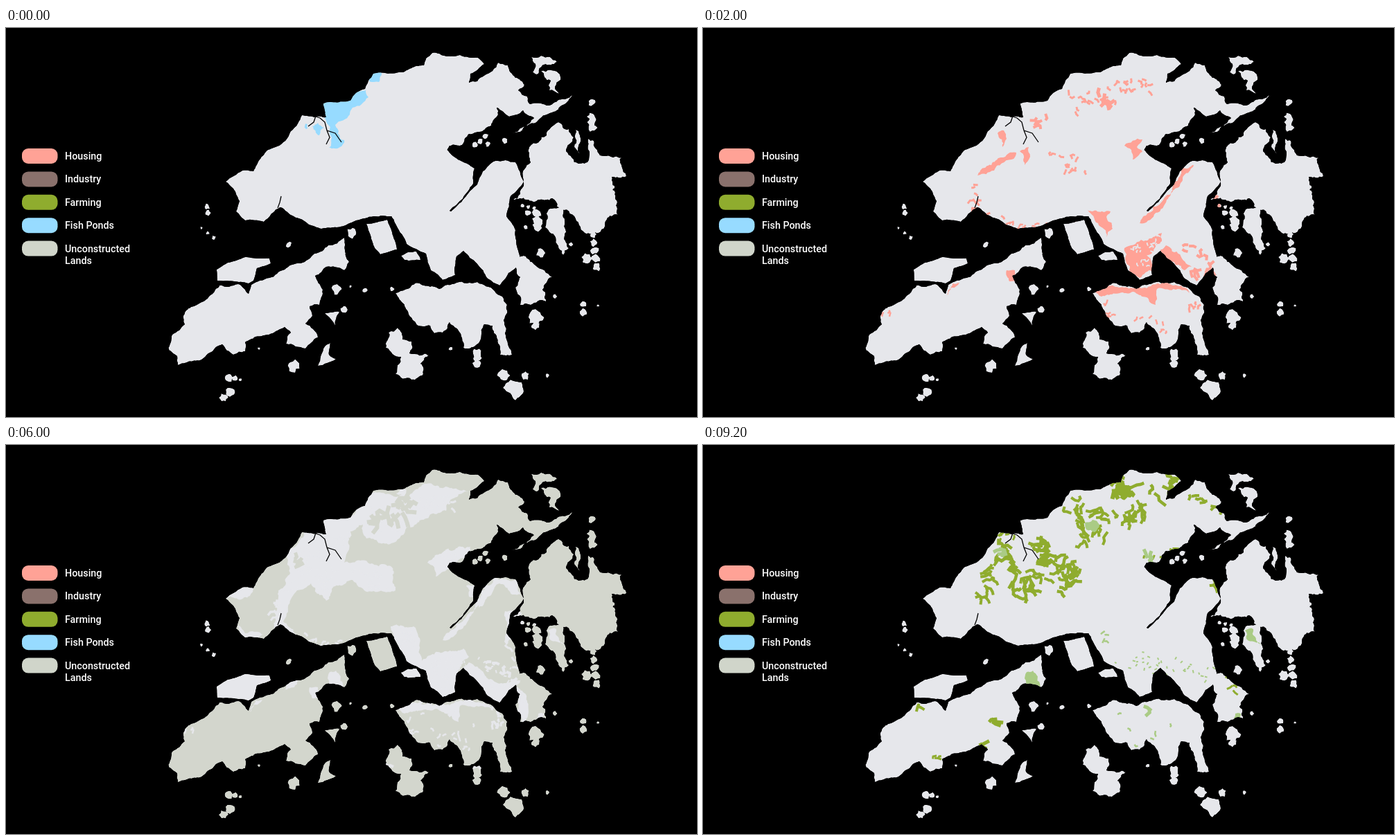
Write an HTML page that moves like this. It is 997 px wide and 562 px high and loops after 10000 ms.

```html
<!DOCTYPE html>
<html lang="en">
<head>
<meta charset="utf-8">
<title>Land use</title>
<style>
  html, body { margin: 0; width: 100%; height: 100%; overflow: hidden; background: #000; }
  svg { display: block; width: 997px; height: 562px; }
  text { font: 500 14.3px Roboto, Arial, sans-serif; fill: #fff; }
</style>
</head>
<body>
<svg id="stage" viewBox="0 0 997 562">
  <defs><clipPath id="coast"><path id="coastShape"/></clipPath></defs>
</svg>
<script>
const STEP = 2000;
const C = {
  land: '#e6e7eb', housing: '#ffa296', industry: '#8a716c', farming: '#8fac2e',
  park: '#aacb85', ponds: '#97dbff', open: '#d3d6cd'
};
const stage = document.getElementById('stage');

function add(parent, tag, attrs, text) {
  const el = document.createElementNS('http://www.w3.org/2000/svg', tag);
  for (const k in attrs) el.setAttribute(k, attrs[k]);
  if (text) el.textContent = text;
  return parent.appendChild(el);
}

const points = s => s.trim().split(/\s+/).map(p => p.split(',').map(Number));
const mix = (p, q, t) => [p[0] + (q[0] - p[0]) * t, p[1] + (q[1] - p[1]) * t];

function random([x, y]) {
  let s = (x * 7919 + y * 104729) >>> 0;
  return () => {
    s = (s + 0x6d2b79f5) >>> 0;
    let t = Math.imul(s ^ s >>> 15, s | 1);
    t ^= t + Math.imul(t ^ t >>> 7, t | 61);
    return ((t ^ t >>> 14) >>> 0) / 4294967296;
  };
}

// Same winding everywhere, so overlapping pieces merge into one shape.
function toPath(pts) {
  const area = pts.reduce((sum, p, i) => {
    const q = pts[(i + 1) % pts.length];
    return sum + p[0] * q[1] - q[0] * p[1];
  }, 0);
  if (area < 0) pts.reverse();
  return 'M' + pts.map(p => p.map(v => v.toFixed(1)).join(' ')).join('L') + 'Z';
}

// Fractal outline through a few key points: every edge is split and bent until it is short.
function outline(str, rough = .1) {
  const keys = points(str), rnd = random(keys[0]), out = [];
  const split = (p, q) => {
    const len = Math.hypot(q[0] - p[0], q[1] - p[1]);
    if (len < 4) return out.push(p);
    const off = Math.max(-3, Math.min(3, (rnd() * 2 - 1) * len * rough)) / len;
    const m = mix(p, q, .5);
    m[0] -= (q[1] - p[1]) * off;
    m[1] += (q[0] - p[0]) * off;
    split(p, m);
    split(m, q);
  };
  keys.forEach((p, i) => split(p, keys[(i + 1) % keys.length]));
  return toPath(out);
}

function blob([x, y], r, rnd) {
  const count = Math.round(6 + r);
  return toPath(Array.from({ length: count }, (_, i) => {
    const a = i / count * 2 * Math.PI, d = r * (.7 + rnd() * .6);
    return [x + Math.cos(a) * d, y + Math.sin(a) * d];
  }));
}

// Evenly spaced islets between two points, from radius r to r2.
function chain(str, count, r, r2 = r) {
  const [p, q = p] = points(str), rnd = random(p);
  let d = '';
  for (let i = 0; i < count; i++) {
    const t = count > 1 ? i / (count - 1) : 0;
    d += blob(mix(p, q, t), r + (r2 - r) * t, rnd);
  }
  return d;
}

// Short random walks strewn along a spine; long ones look like winding plots, short ones like specks.
function strands(str, spread, count, width, steps = 2) {
  const spine = points(str), rnd = random(spine[0]), pull = () => (rnd() + rnd() - 1) * spread * 1.4;
  let d = '';
  for (let i = 0; i < count; i++) {
    const t = (i + rnd()) / count * (spine.length - 1), k = Math.floor(t);
    const [x, y] = mix(spine[k], spine[k + 1], t - k);
    let a = rnd() * 2 * Math.PI;
    d += `M${(x + pull()).toFixed(1)} ${(y + pull()).toFixed(1)}`;
    for (let j = 0; j < steps; j++) {
      const len = width * (.4 + rnd() * .9);
      a += (rnd() - .5) * 2.6;
      d += `l${(Math.cos(a) * len).toFixed(1)} ${(Math.sin(a) * len).toFixed(1)}`;
    }
  }
  return { d, width };
}

const area = (str, rough = .2) => ({ d: outline(str, rough) });

function paint(parent, items, color) {
  items.forEach(({ d, width }) => add(parent, 'path', width
    ? { d, fill: 'none', stroke: color, 'stroke-width': width, 'stroke-linecap': 'square' }
    : { d, fill: color }));
}

const airport = '304,349 320,339 345,331 380,333 382,340 362,347 357,365 350,369 305,365';

const coast = [
  // Mainland: north-west, north-east, centre, east, south-east
  outline(`317,222 341,206 357,207 366,190 378,176 403,163 421,138 427,126 462,129 458,109 497,105
    505,94 518,88 530,66 572,64 603,54 606,44 615,36 636,41 655,39 681,43 690,52 670,66 668,78
    674,120 640,170 600,250 557,272 505,278 490,285 455,290 437,284 415,272 396,259 372,280 345,278
    332,265 337,250 328,232`, .08),
  outline(`655,78 680,77 702,62 710,50 724,54 735,72 748,82 739,90 752,99 756,110 780,112 817,97
    788,122 742,150 728,152 762,130 746,119 726,128 708,115 710,125 700,141 668,153 658,169 632,171
    620,160 640,100`, .13),
  outline(`560,180 632,171 645,185 676,203 674,225 640,264 642,265 661,246 680,226 688,207 706,192
    735,194 747,222 728,243 722,272 735,292 742,340 712,372 695,362 660,322 650,330 648,357 630,364
    613,350 606,326 578,312 563,285 555,270`, .07),
  outline(`748,204 757,194 755,172 780,155 797,136 812,146 819,158 808,178 826,196 841,190 840,160
    848,163 857,184 888,187 895,214 874,215 882,252 883,270 868,274 855,296 835,296 820,272 795,258
    788,246 770,248 732,248 747,228`, .2),
  outline(`728,338 750,330 764,343 788,360 774,378 779,395 757,400 742,400 735,375 742,360`, .2),
  // Large islands
  outline(`235,462 240,443 258,428 258,411 285,395 308,372 335,370 350,384 354,371 380,361 402,349
    445,326 465,314 488,303 495,338 488,350 462,345 446,358 457,378 452,400 438,402 442,416 432,427
    450,447 432,463 404,456 411,440 402,432 360,446 345,454 345,467 328,472 312,457 280,480 248,487
    247,474`, .12),
  outline(`562,383 590,369 625,377 650,368 680,367 705,380 723,400 718,422 730,472 713,472 702,430
    690,428 676,460 660,462 652,436 640,425 630,440 618,441 612,430 592,428 575,400`, .14),
  outline(`552,440 565,433 572,450 585,453 582,470 612,472 598,485 602,500 585,508 562,500 570,475
    548,462`, .2),
  outline(airport, .03),
  outline('520,283 550,277 564,320 540,327 532,318', .04),
  outline('570,329 592,323 598,335 575,335'),
  // Small islands
  outline('758,42 772,40 795,49 776,53 768,66 760,64 764,52', .2),
  outline('772,62 797,65 800,75 792,85 798,95 784,90 786,76', .2),
  outline('822,147 829,164 828,182 820,172', .2),
  outline('783,262 800,258 806,300 812,318 804,328 778,288', .2),
  outline('717,520 728,508 744,512 747,525 735,538'),
  outline('460,460 468,455 466,472 476,478 450,488'),
  outline('460,412 481,410 475,430'),
  chain('766,268 767,286', 3, 7), chain('745,257 762,260', 3, 3), chain('753,267 750,288', 2, 4, 3),
  chain('845,107', 1, 5), chain('845,128 846,144', 3, 6), chain('676,169 692,157', 3, 4),
  chain('695,167 720,163', 2, 4), chain('847,298 852,345', 5, 5, 6), chain('838,333', 1, 7),
  chain('771,325', 1, 6), chain('815,313 875,230', 2, 3), chain('833,399 833,411', 2, 4, 5),
  chain('854,401 792,388', 2, 2, 3), chain('764,418 764,430', 2, 10, 6), chain('718,502 781,502', 3, 8, 3),
  chain('679,470 680,484', 3, 6), chain('642,463', 1, 3), chain('415,488', 1, 8),
  chain('477,377 518,379', 2, 7, 4), chain('557,377 497,373', 2, 3, 2), chain('488,407', 1, 5),
  chain('499,296', 1, 7), chain('322,505 338,508', 3, 6, 2), chain('323,526 314,534', 2, 6),
  chain('290,258 291,267', 2, 4), chain('282,289 300,303', 3, 2, 3), chain('408,313', 1, 4),
  chain('237,463 365,463', 2, 3, 2)
].join('');

const ponds = [
  area(`456,110 497,103 505,92 520,88 523,100 500,115 496,125 475,140 488,162 482,172 466,173
    470,158 460,130`),
  area('524,68 541,62 538,78 524,77'),
  area('442,142 450,137 459,144 452,155'),
  strands('378,176 437,137', 1, 2, 3)
];

const housing = [
  area('396,213 400,206 430,187 452,180 445,190 420,206'),
  area('457,178 470,172 472,186 464,198'),
  area('425,152 434,148 438,160 432,172'),
  area('608,170 634,161 626,172 634,179 620,190 618,176'),
  area('686,217 692,202 708,198 688,228 668,252 630,282 650,258 668,243'),
  area('555,263 588,265 583,276 591,290 582,302 570,282'),
  area('608,318 632,306 662,296 662,308 640,328 650,350 630,361 616,354'),
  area('660,320 668,314 705,345 695,350 668,336'),
  area('564,380 600,375 640,376 665,365 702,383 655,377 653,400 643,392 610,383 575,388'),
  area('438,350 450,350 458,366 442,366'),
  area('352,386 360,369 370,368'),
  strands('388,222 394,250 390,266 430,272', 4, 14, 3),
  strands('440,283 463,288 545,273', 2, 12, 2.5),
  strands('482,133 484,140 500,128', 3, 6, 4),
  strands('497,183 540,187 515,204 555,203', 5, 14, 3),
  strands('520,108 580,104 615,80 645,80', 13, 34, 3),
  strands('575,100 590,110', 5, 7, 5),
  strands('695,318 732,345 705,355', 9, 16, 4),
  strands('577,395 587,418 655,422 668,445', 5, 14, 2.5),
  strands('700,400 715,404', 4, 5, 3),
  strands('738,251 741,258', 3, 5, 5),
  strands('258,412 270,416', 3, 3, 2.5)
];
const housingGaps = [strands('612,325 655,308 630,350', 9, 26, 1.8)];

const industry = [
  area(airport, .03),
  area('270,250 312,250 312,310 270,310'),
  area('562,293 575,306 608,325 608,335 595,340 568,338 588,324 570,312'),
  area('317,222 330,208 345,204 357,206 352,218'),
  area('330,260 345,272 372,274 360,284 340,282'),
  area('512,186 526,183 535,187 528,193'),
  area('563,70 572,62 581,64 576,74'),
  area('638,158 652,157 652,168 638,168'),
  area('664,203 678,202 677,218 668,219'),
  area('740,372 750,370 754,385 746,403'),
  area('400,357 404,346 421,340 416,350'),
  strands('525,105 575,100 617,80', 12, 24, 3),
  strands('410,153 420,180 436,183', 4, 11, 3.5),
  strands('452,160 458,156', 2, 4, 5),
  strands('448,195 452,210 474,184', 4, 8, 3),
  strands('388,222 392,250', 4, 7, 3.5),
  strands('567,265 580,285', 5, 7, 2.5),
  strands('614,322 630,350 648,340', 6, 17, 4),
  strands('672,337 692,350 715,365', 3, 11, 4),
  strands('722,285 736,315 730,350', 3, 6, 3),
  strands('578,377 605,377 643,381', 3, 12, 4),
  strands('700,380 713,392 708,410', 3, 6, 3),
  strands('546,463 556,463', 2, 3, 4),
  strands('678,464 682,464', 2, 3, 4),
  strands('750,262 765,262', 3, 3, 2.5)
];

const farming = [
  strands('592,65 608,64 620,72', 5, 13, 6),
  strands('606,44 600,62 675,72 680,48', 4, 17, 4.5, 4),
  strands('530,102 580,102 635,92 610,106', 6, 25, 4, 4),
  strands('545,78 545,110 548,138 580,122', 5, 17, 4, 4),
  strands('482,166 494,172', 4, 6, 7),
  strands('490,134 489,162 545,182 512,212', 6, 25, 4.5, 4),
  strands('438,150 448,178 458,220 480,205', 6, 22, 4.5, 4),
  strands('422,165 415,190 396,232', 4, 13, 4, 4),
  strands('470,185 535,190', 7, 12, 4, 4),
  strands('424,140 430,129 448,132', 1.5, 6, 3),
  strands('695,70 726,82 746,100', 4, 8, 4),
  strands('640,162 668,158 690,148', 3, 7, 3),
  strands('738,196 739,204', 1, 3, 4),
  strands('308,378 312,376', 1, 2, 4),
  strands('416,398 420,402', 2, 4, 5),
  strands('400,432 404,433', 1, 2, 5),
  strands('330,452 340,452', 1, 3, 3),
  strands('762,338 768,356', 3, 4, 3)
];

const parks = [
  area('467,328 476,326 486,345 486,352 468,352'),
  area('551,112 562,108 572,115 565,126 553,122'),
  area('782,268 794,266 798,282 806,290 784,280'),
  area('768,388 776,388 775,404 767,402'),
  strands('432,148 438,158', 3, 5, 5),
  strands('642,162 650,162', 2, 4, 5),
  strands('644,382 647,382', 1, 2, 5),
  strands('612,312 662,318 735,330', 13, 38, 2, 1),
  strands('576,264 584,292', 3, 4, 2.5),
  strands('597,376 625,438 692,397', 3, 6, 2.5)
];

// Everything that is not open land, with wide belts round the towns.
const built = [
  area(`405,160 432,122 458,130 456,108 497,103 524,66 572,72 600,58 668,68 640,80 635,95 600,108
    556,142 520,135 515,115 497,125 488,170 555,175 562,210 520,212 500,195 470,208 462,225 440,200
    420,210 400,255 415,270 420,284 386,258 392,215 410,185`),
  area('610,170 640,152 670,147 667,163 622,188'),
  area('682,235 686,210 704,192 735,194 742,216 712,200 690,228'),
  area('555,262 588,262 600,312 660,294 668,306 652,328 650,364 618,364 568,300'),
  area('662,316 680,320 705,342 742,340 708,374 670,344'),
  area('735,345 752,372 750,404 736,385'),
  area('566,328 584,320 602,325 602,340 575,339'),
  area('720,240 742,245 740,262 722,290'),
  ...housing, ...industry, ...parks
];
const openGaps = [strands('525,112 555,95 590,80', 8, 18, 6, 3), strands('418,160 420,175', 3, 5, 5)];

document.getElementById('coastShape').setAttribute('d', coast);
const map = add(stage, 'g', { 'clip-path': 'url(#coast)' });
add(map, 'path', { d: coast, fill: C.land });

const layers = [
  [[ponds, C.ponds]],
  [[housing, C.housing], [housingGaps, C.land]],
  [[industry, C.industry]],
  [[[{ d: coast }], C.open], [built, C.land], [openGaps, C.open]],
  [[farming, C.farming], [parks, C.park]]
].map(parts => {
  const g = add(map, 'g', { visibility: 'hidden' });
  parts.forEach(([items, color]) => paint(g, items, color));
  return g;
});

// Creeks
add(stage, 'path', {
  d: `M441 126L453 130L460 136L463 148L475 152L484 165M447 127L444 136L436 142
      M463 148L467 158L462 168M397 243L395 252L392 260`,
  fill: 'none', stroke: '#000', 'stroke-width': 1.3
});

[['Housing', C.housing], ['Industry', C.industry], ['Farming', C.farming],
  ['Fish Ponds', C.ponds], ['Unconstructed', '#d0d5ca']].forEach(([name, fill], i) => {
  const y = 174 + i * 33.4;
  add(stage, 'rect', { x: 23, y, width: 51.5, height: 22, rx: 9, fill });
  add(stage, 'text', { x: 85, y: y + 16 }, name);
});
add(stage, 'text', { x: 85, y: 341 }, 'Lands');

function frame(now) {
  const shown = Math.floor(now / STEP) % layers.length;
  layers.forEach((g, i) => g.setAttribute('visibility', i === shown ? 'visible' : 'hidden'));
  requestAnimationFrame(frame);
}
frame(performance.now());
</script>
</body>
</html>
```
